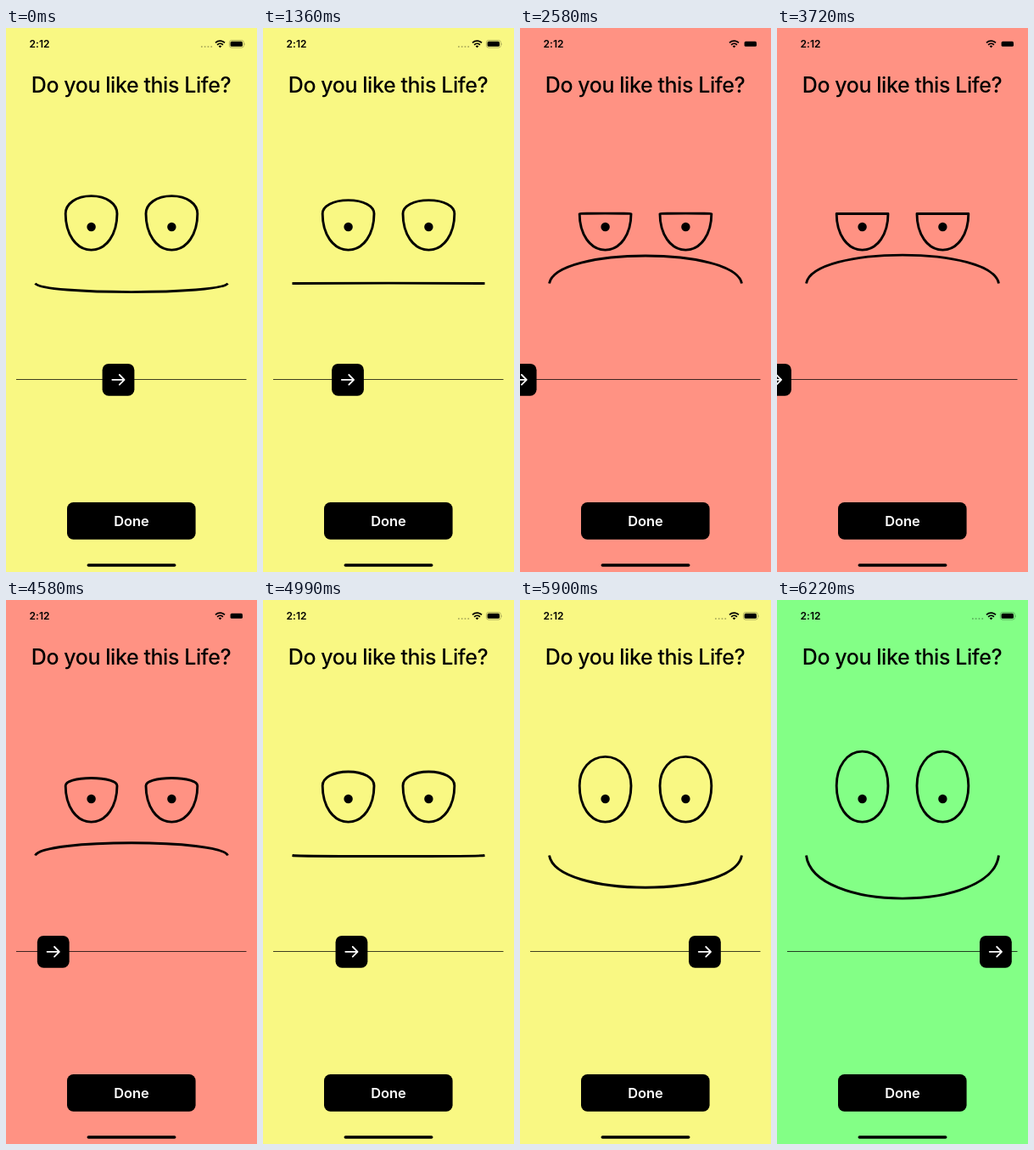
An HTML page that plays this animation: 296x640 px, repeating every 8 s.

```html
<!DOCTYPE html>
<html lang="en">
<head>
<meta charset="utf-8">
<style>
  html, body { margin: 0; width: 100%; height: 100%; overflow: hidden; }
  svg { display: block; width: 100%; height: 100%; }
  text { font-family: Inter, Roboto, sans-serif; font-weight: 600; }
  .pen { fill: none; stroke: #000; stroke-width: 2.9; stroke-linejoin: round; }
</style>
</head>
<body>
<svg id="stage" viewBox="0 0 296 640">
  <!-- status bar -->
  <text x="27.6" y="23" font-size="12" letter-spacing=".05">2:12</text>
  <g id="faint" fill="none" stroke="#000" opacity=".35">
    <path d="M230 22h14" stroke-width="1.7" stroke-dasharray="1.7 2.1"/>
    <rect x="263.4" y="14.5" width="17" height="8.6" rx="2.6" stroke-width=".8"/>
    <path d="M281.4 17.4q1.4 1.4 0 2.8z" fill="#000" stroke="none"/>
  </g>
  <g fill="none" stroke="#000" stroke-width="1.7">
    <path d="M247 17.4a7.9 7.9 0 0 1 11 0M249.1 19.8a4.9 4.9 0 0 1 6.8 0"/>
    <path d="M252.5 23.2l-1.8-1.8a2.6 2.6 0 0 1 3.6 0z" fill="#000" stroke="none"/>
  </g>
  <rect x="264.6" y="15.8" width="14.4" height="6" rx="1.6"/>

  <text x="147.5" y="75.5" font-size="25" letter-spacing="-.44" text-anchor="middle" style="font-weight:550">Do you like this Life?</text>

  <!-- face -->
  <path id="eyes" class="pen"/>
  <circle cx="100.6" cy="234" r="5.2"/>
  <circle cx="195.4" cy="234" r="5.2"/>
  <path id="mouth" class="pen"/>

  <!-- slider -->
  <path d="M12 413.5H283.5" stroke="#000" opacity=".75"/>
  <g id="knob">
    <rect x="-18.9" y="-18.9" width="37.8" height="37.8" rx="7.5"/>
    <path d="M-7.2 0H7M1.3-5.8L7.1 0L1.3 5.8" fill="none" stroke="#fff" stroke-width="1.8" stroke-linecap="round" stroke-linejoin="round"/>
  </g>

  <rect x="72" y="558" width="151.6" height="43.8" rx="7.5"/>
  <text x="148" y="586" font-size="16.4" text-anchor="middle" fill="#fff">Done</text>
  <rect x="95.5" y="630.2" width="105" height="3.6" rx="1.8"/>
</svg>
<script>
const $ = id => document.getElementById(id);
const LOOP = 8000, STEP = 113.6;

// Drags of the knob: [time in ms, knob centre x]
const drags = [
  [[1360, 100], [1815, 55.3], [2160, 21], [2390, 4], [2580, -2]],
  [[3720, -2], [4060, 17], [4400, 43.4], [4970, 104.5], [5879, 218], [6220, 258]]
];

function knobX(time) {
  if (time < 1360) return 132.5;
  const keys = drags[time < 3720 ? 0 : 1], start = keys[0][0];
  // the screen refreshes in coarse steps while dragging
  const t = start + Math.floor((time - start) / STEP) * STEP;
  const i = keys.findIndex(k => k[0] > t);
  if (i < 0) return keys[keys.length - 1][1];
  const [t0, x0] = keys[i - 1], [t1, x1] = keys[i];
  return x0 + (x1 - x0) * (t - t0) / (t1 - t0);
}

// Rounded eye: a bowl of fixed depth under a lid that opens
function eye(cx, lid) {
  const y = 218.5, rx = 30.4, k = rx * 0.4;
  const half = (side, ry) =>
    `C${cx - side * rx} ${y + ry * 0.55} ${cx - side * (rx - k)} ${y + ry} ${cx} ${y + ry}` +
    `C${cx + side * (rx - k)} ${y + ry} ${cx + side * rx} ${y + ry * 0.55} ${cx + side * rx} ${y}`;
  return `M${cx - rx} ${y}${half(1, -lid)}${half(-1, 42.6)}Z`;
}

function draw(time) {
  const x = knobX(time), mood = (x + 2) / 260;
  const sad = x < 74, happy = x > 222;
  const lid = 40.4 * mood, lip = 256 + 112 * mood;
  $('stage').style.background = sad ? '#ff9283' : happy ? '#83ff86' : '#f9f883';
  $('faint').style.display = sad ? 'none' : '';
  $('eyes').setAttribute('d', eye(100.6, lid) + eye(195.4, lid));
  $('mouth').setAttribute('d', `M34.5 300.5C43 ${lip} 253 ${lip} 261.5 300.5`);
  $('knob').setAttribute('transform', `translate(${x} 413.8)`);
}

const begin = performance.now();
(function frame() {
  draw((performance.now() - begin) % LOOP);
  requestAnimationFrame(frame);
})();
</script>
</body>
</html>
```
